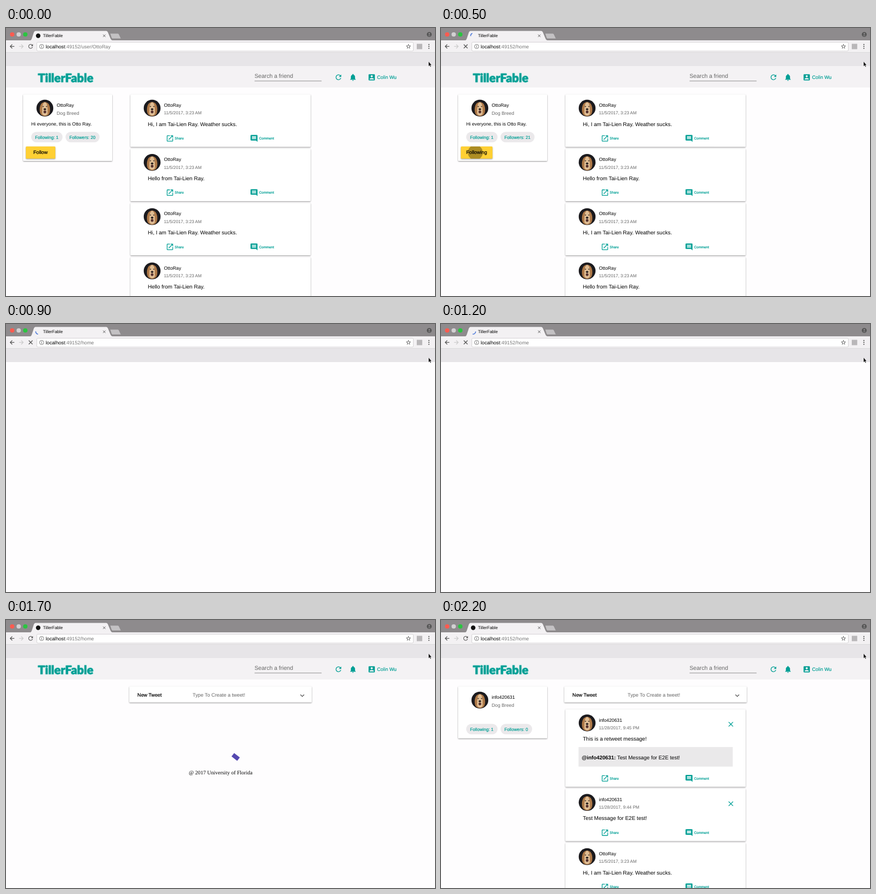
These frames come from a looping animation (800 px wide and 500 px high, 2.3 s). An HTML page:

```html
<!DOCTYPE html>
<html lang="en">
<head>
<meta charset="utf-8">
<title>TillerFable</title>
<style>
html, body { margin: 0; width: 100%; height: 100%; overflow: hidden; background: #fefdfe; }
svg { display: block; width: 800px; height: 500px; font-family: "Liberation Sans", Arial, sans-serif; text-rendering: geometricPrecision; }
.card { fill: #fff; filter: drop-shadow(0 1px 1px rgba(0,0,0,.42)); }
.teal { fill: #009f95; }
.medium { stroke: currentColor; stroke-width: .22; }
.teal.medium { stroke: #009f95; }
.grey { fill: #666; }
.line { fill: none; stroke: #555; stroke-width: 1.3; }
.brand { font-family: Lato, sans-serif; font-weight: 900; stroke: #009f95; stroke-width: .5; stroke-linejoin: round; filter: drop-shadow(0 0 1px #9fdcd8); }
.serif { font-family: "Liberation Serif", Times, serif; }
</style>
</head>
<body>
<svg id="stage" viewBox="0 0 800 500"></svg>
<script>
const LOOP = 2300, STEP = 100;
const CLICK = 400, LOAD = 500, BLANK = 600, HOME = 1700, FEED = 1800;
const USER = 'OttoRay', TESTER = 'info420631';

const ICONS = {
  refresh: 'M17.65 6.35C16.2 4.9 14.21 4 12 4c-4.42 0-7.99 3.58-7.99 8s3.57 8 7.99 8c3.73 0 6.84-2.55 7.73-6h-2.08c-.82 2.33-3.04 4-5.65 4-3.31 0-6-2.69-6-6s2.69-6 6-6c1.66 0 3.14.69 4.22 1.78L13 11h7V4z',
  bell: 'M12 22c1.1 0 2-.9 2-2h-4c0 1.1.89 2 2 2zm6-6v-5c0-3.07-1.64-5.64-4.5-6.32V4c0-.83-.67-1.5-1.5-1.5s-1.5.67-1.5 1.5v.68C7.63 5.36 6 7.92 6 11v5l-2 2v1h16v-1z',
  person: 'M3 5v14q0 2 2 2h14q2 0 2-2V5q0-2-2-2H5q-2 0-2 2zm12 4a3 3 0 0 1-6 0 3 3 0 0 1 6 0zm-9 8c0-2 4-3.1 6-3.1s6 1.1 6 3.1v1H6z',
  share: 'M19 19H5V5h7V3H5q-2 0-2 2v14q0 2 2 2h14q2 0 2-2v-7h-2zM14 3v2h3.59l-9.83 9.83 1.41 1.41L19 6.41V10h2V3z',
  comment: 'M22 4q0-2-2-2H4q-2 0-2 2v12q0 2 2 2h14l4 4zM18 14H6v-2h12zm0-3H6V9h12zm0-3H6V6h12z',
  close: 'M19 6.41L17.59 5 12 10.59 6.41 5 5 6.41 10.59 12 5 17.59 6.41 19 12 13.41 17.59 19 19 17.59 13.41 12z',
  chevron: 'M16.59 8.59L12 13.17 7.41 8.59 6 10l6 6 6-6z',
  star: 'M22 9.24l-7.19-.62L12 2 9.19 8.63 2 9.24l5.46 4.73L5.82 21 12 17.27 18.18 21l-1.63-7.03zM12 15.4l-3.76 2.27 1-4.28-3.32-2.88 4.38-.38L12 6.1l1.71 4.04 4.38.38-3.32 2.88 1 4.28z'
};

const text = (x, y, size, str, cls = '') =>
  `<text x="${x}" y="${y}" font-size="${size}" class="${cls}">${str}</text>`;
const rect = (x, y, w, h, fill, extra = '') =>
  `<rect x="${x}" y="${y}" width="${w}" height="${h}" fill="${fill}" ${extra}/>`;
const circle = (x, y, r, fill, extra = '') =>
  `<circle cx="${x}" cy="${y}" r="${r}" fill="${fill}" ${extra}/>`;
const path = (d, fill, extra = '') => `<path d="${d}" fill="${fill}" ${extra}/>`;
const line = (d, extra = '') => `<path d="${d}" class="line" ${extra}/>`;
const card = (x, y, w, h) => rect(x, y, w, h, '#fff', 'class="card" rx="1"');
// icon centred on x, y
const icon = (name, x, y, fill = '#009f95', s = .65) =>
  path(ICONS[name], fill, `transform="translate(${x} ${y}) scale(${s}) translate(-12 -12)"`);

const avatar = (x, y) => `<g transform="translate(${x} ${y})">` +
  circle(0, 0, 15.7, '#1b1a1e') +
  path('M-6 13C-11 10-11-4-6-9Q0-14 6-9C11-4 11 10 6 13Q0 17-6 13Z', '#ad7847') +
  path('M-5 11Q-6-10 0-11Q6-10 5 11Q0 17-5 11Z', '#dfbd94') +
  circle(-3.2, -3, 1, '#2a1d18') + circle(3.2, -3, 1, '#2a1d18') +
  '<ellipse cy="2" rx="2.4" ry="1.8" fill="#211b1c"/><ellipse cy="7" rx="2.5" ry="2.7" fill="#573330"/></g>';

function spinner(t) {
  const mid = t < 900 ? 210 + .725 * (t - 500) : 140 + .9 * (t - 900);
  const half = 40 + Math.min(20, (t - 500) / 50);
  const at = deg => {
    const a = deg * Math.PI / 180;
    return `${60 + 4.6 * Math.cos(a)} ${14.3 + 4.6 * Math.sin(a)}`;
  };
  return path(`M${at(mid - half)}A4.6 4.6 0 0 1 ${at(mid + half)}`, 'none', 'stroke="#3f6fd8" stroke-width="1.4"');
}

function browser(t) {
  const loading = t >= LOAD && t < HOME;
  const page = t < LOAD ? 'user/' + USER : 'home';
  return rect(0, 0, 800, 24, '#8e8b8d') +
    circle(11.5, 12, 4.1, '#fc5b50') + circle(23.7, 12, 4.1, '#d2d0d2') + circle(36, 12, 4.1, '#2bc440') +
    rect(0, 23, 800, 23, '#f3f1f3') + rect(0, 45.5, 800, 25.5, '#e7e5e8') + rect(0, 45, 800, .7, '#d5d3d5') +
    path('M45 23.5Q47 23 48 20L52 8Q53 5.5 55 5.5H187Q189 5.5 190 8L195 20Q196 23 199 23.5Z', '#f3f1f3') +
    path('M194.5 10.5H208.5Q210 10.5 210.5 12L214 19.5H199Q197.500 19.500 197 18Z', '#c3c1c3') +
    (loading ? spinner(t) : circle(60, 14.5, 4.2, '#111')) +
    text(69, 17, 8, 'TillerFable') + line('M181 12.300l4.400 4.400m0-4.400l-4.400 4.400', 'style="stroke-width:1"') +
    circle(789.3, 12, 4.6, '#555') + circle(789.3, 10.8, 1.5, '#8e8b8d') +
    path('M786.500 14.800Q789.300 11.800 792.100 14.800Z', '#8e8b8d') +
    line('M15.500 34.300H8m3.600-3.700L7.900 34.300l3.700 3.700') +
    line('M24.500 34.300H32m-3.600-3.700l3.700 3.700-3.700 3.700', 'style="stroke:#ccc"') +
    (loading ? line('M42.500 30.800l7 7m0-7l-7 7') : icon('refresh', 46, 34.3, '#555', .53)) +
    rect(57.5, 26.5, 702, 16.5, '#fff', 'stroke="#cccacc" stroke-width=".8" rx="2"') +
    circle(66.5, 34.5, 3.9, 'none', 'stroke="#666" stroke-width=".9"') +
    rect(66, 33.8, 1, 2.8, '#666') + rect(66, 32, 1, 1, '#666') +
    text(74, 37.8, 9.2, `localhost<tspan fill="#777">:49152/${page}</tspan>`) +
    icon('star', 750.5, 34.3, '#555', .47) + rect(766, 29.5, 10.2, 10, '#b9b7b9') +
    [30.8, 34.4, 38].map(y => circle(788.6, y, 1.1, '#555')).join('');
}

const header = () => rect(0, 71, 800, 40, '#f4f2f4') +
  text(59.500, 101, 22, 'TillerFable', 'teal brand') +
  text(463.5, 92.5, 10.6, 'Search a friend', 'grey') + rect(463.5, 98.5, 125, .8, '#777') +
  icon('refresh', 620, 92) + icon('bell', 647, 92) + icon('person', 682, 92) +
  text(692, 95, 9, 'Colin Wu', 'teal medium');

const chip = (x, w, str) => rect(x, 193.7, w, 19.6, '#ebe9eb', 'rx="9.8"') +
  text(x + 7.2, 206.5, 8.2, str, 'teal medium');

const profile = (name, followers, height, chipWidth) => card(32, 124, 166, height) +
  avatar(72.5, 149.5) + text(94.5, 147, 8.75, name) + text(94.5, 162, 8.75, 'Dog Breed', 'grey') +
  chip(47, 58.5, 'Following: 1') + chip(111, chipWidth, 'Followers: ' + followers);

function followButton(t) {
  const on = t >= CLICK, w = on ? 59 : 55;
  const ripple = on ? circle(64, 232.3, 7 + (t - CLICK) * .07, '#000', 'opacity=".32" clip-path="url(#button)"') : '';
  return `<clipPath id="button">${rect(37, 221, w, 22.8, '#000')}</clipPath>` +
    rect(37, 221, w, 22.8, '#ffd034', 'rx="1.5" style="filter:drop-shadow(0 1px 1px #0006)"') +
    text(on ? 47 : 51, 235.2, 9.2, on ? 'Following' : 'Follow', 'medium') + ripple;
}

function post(y, name, date, message, own, quote) {
  const extra = quote ? 47 : 0, foot = y + 82 + extra;
  return card(232, y, 336, 97.7 + extra) + avatar(272.5, y + 25.5) +
    text(294.5, y + 23, 8.75, name) + text(294.5, y + 37.4, 8.2, date, 'grey') +
    text(264.5, y + 58.6, 10, message) +
    (own ? icon('close', 540.5, y + 28) : '') +
    (quote ? rect(256.5, y + 70.5, 287.5, 36.5, '#eae9ea') +
      text(262.5, y + 93, 9.8, `<tspan font-weight="bold">@${name}:</tspan> ${quote}`) : '') +
    icon('share', 305.7, foot) + text(314.5, foot + 2.2, 6.4, 'Share', 'teal medium') +
    icon('comment', 462.5, foot) + text(472, foot + 2.2, 6.4, 'Comment', 'teal medium');
}

const OLD = '11/5/2017, 3:23 AM';
const WEATHER = 'Hi, I am Tai-Lien Ray. Weather sucks.', HELLO = 'Hello from Tai-Lien Ray.';
const TEST = 'Test Message for E2E test!';

const userPage = t => profile(USER, t < CLICK ? 20 : 21, 124, 63.5) +
  text(47, 182, 8.75, 'Hi everyone, this is Otto Ray.') + followButton(t) +
  [0, 1, 2, 3].map(i => post(124 + 101.2 * i, USER, OLD, i % 2 ? HELLO : WEATHER)).join('');

const composer = () => card(230, 124, 340, 29.7) + text(245, 142.5, 9.2, 'New Tweet', 'medium') +
  text(348, 142.5, 9.3, 'Type To Create a tweet!', 'grey') + icon('chevron', 552.5, 141, '#555');

const waiting = () => rect(-6.7, -4, 13.4, 8, '#5548b0', 'transform="translate(428.3 255.500) rotate(38)"') +
  text(341, 287.5, 10, '@ 2017 University of Florida', 'serif');

const feed = () => profile(TESTER, 0, 96.7, 59) +
  post(166.5, TESTER, '11/28/2017, 9:45 PM', 'This is a retweet message!', true, TEST) +
  post(314.8, TESTER, '11/28/2017, 9:44 PM', TEST, true) +
  post(416, USER, OLD, WEATHER);

const cursor = path('M788 62.500V71.500L790 69.700L791.400 72.700L792.800 72.100L791.400 69.200H793.700Z', '#000', 'stroke="#fff" stroke-width=".5"');

function scene(t) {
  let page = '';
  if (t < BLANK) page = header() + userPage(t);
  else if (t >= HOME) page = header() + composer() + (t < FEED ? waiting() : feed());
  return rect(0, 0, 800, 500, '#fefdfe') + page + browser(t) + cursor;
}

const stage = document.getElementById('stage');
let shown = -1;
function tick() {
  const t = Math.floor(performance.now() % LOOP / STEP) * STEP;
  if (t !== shown) stage.innerHTML = scene(shown = t);
  requestAnimationFrame(tick);
}
tick();
</script>
</body>
</html>
```
